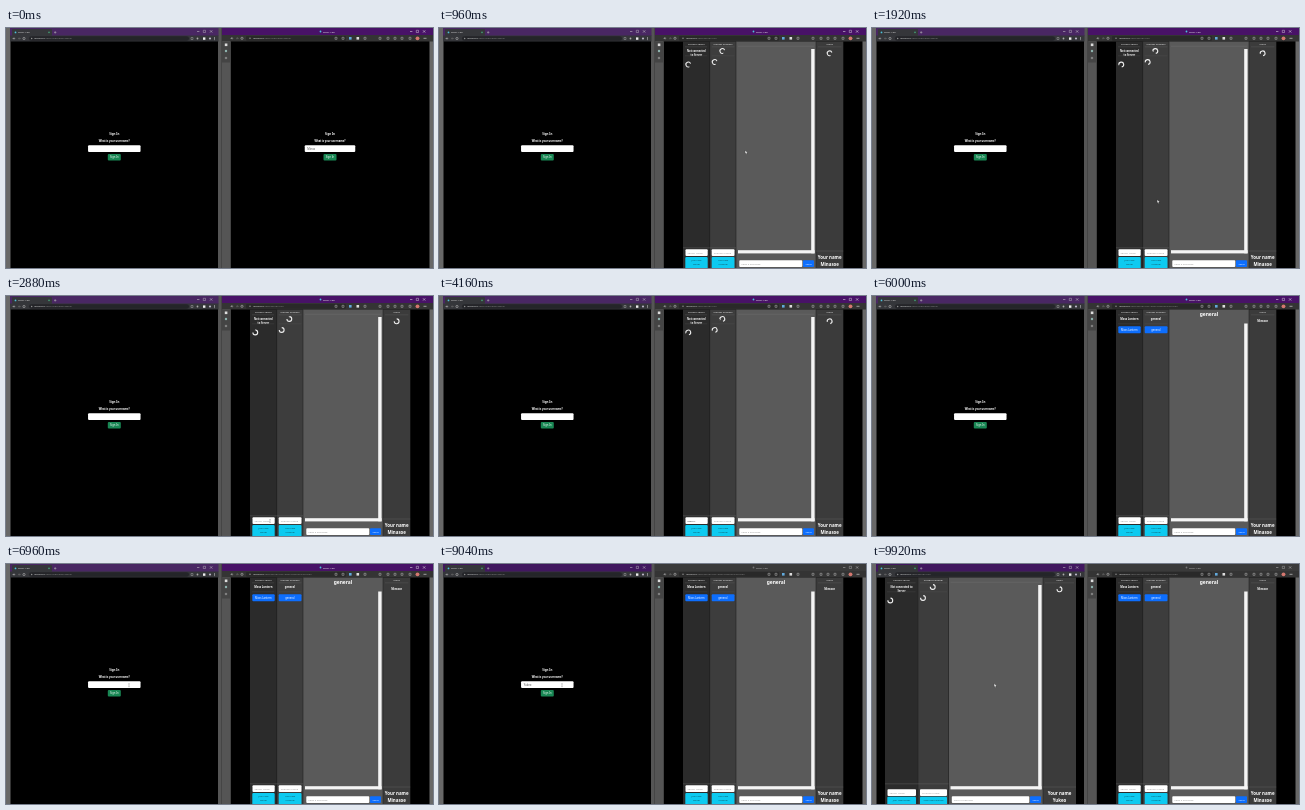
An HTML page for the animation above (10000 ms loop, 427 by 240 pixels).

```html
<!DOCTYPE html>
<html lang="en">
<head>
<meta charset="utf-8">
<title>Two chat windows</title>
<style>
  html, body { margin: 0; width: 100%; height: 100%; overflow: hidden; background: #666; }
  svg { display: block; width: 100vw; height: 100vh; }
  text { font-family: "Noto Sans", "Open Sans", sans-serif; white-space: pre; }
</style>
</head>
<body>
<svg id="stage" viewBox="0 0 427 240" preserveAspectRatio="none"></svg>
<script>
const LOOP = 10000, STEP = 80;
const HOST_NAME = 'Minasoe', GUEST_NAME = 'Yukeo', SERVER = 'Moss Lantern';
const SIGNED_IN = 880, JOINED = 5360, FOCUS_LEFT = 7120, GUEST_IN = 9440;
const GUEST_KEYS = [7360, 7760, 8080, 8560, 9040];
const stage = document.getElementById('stage');

const rect = (x, y, w, h, fill, r = 0) =>
  `<rect x="${x}" y="${y}" width="${w}" height="${h}" rx="${r}" fill="${fill}"/>`;
const dot = (x, y, r, fill) => `<circle cx="${x}" cy="${y}" r="${r}" fill="${fill}"/>`;
const line = (d, color, w = .5) =>
  `<path d="${d}" fill="none" stroke="${color}" stroke-width="${w}"/>`;
const text = (x, y, size, str, { fill = '#fff', weight = 400, anchor = 'middle' } = {}) =>
  `<text x="${x}" y="${y}" font-size="${size}" fill="${fill}" font-weight="${weight}" text-anchor="${anchor}">${str}</text>`;
const bold = (x, y, size, str) => text(x, y, size, str, { weight: 700 });
const label = (x, y, size, str, fill) => text(x, y, size, str, { fill, anchor: 'start' });

function spinner(x, y, age) {
  const angle = 45 + age / 750 * 360;
  return `<circle cx="${x}" cy="${y}" r="2.4" pathLength="4" stroke-dasharray="3 1" fill="none"
    stroke="#eee" stroke-width="1.1" transform="rotate(${angle} ${x} ${y})"/>`;
}

function windowButtons(x, color) {
  return line(`M${x} 3.5h2.4`, color) + line(`M${x + 6.3} 2.3h2.2v2.2h-2.2z`, color, .4) +
    line(`M${x + 13} 2.3l2.3 2.3m0-2.3l-2.3 2.3`, color);
}

function navButtons(x, y) {
  return line(`M${x + 2.2} ${y}h-2.2l1-1m-1 1l1 1`, '#ccc', .5) +
    line(`M${x + 5} ${y}h2.2l-1-1m1 1l-1 1`, '#777', .5) +
    `<circle cx="${x + 11}" cy="${y}" r="1.1" fill="none" stroke="#ccc" stroke-width=".5"/>`;
}

function address(x, y, path) {
  return text(x, y, 2.5, `localhost<tspan fill="#888">:3000/${path}</tspan>`, { fill: '#eee', anchor: 'start' });
}

function leftChrome(active, path) {
  return rect(4, 0, 208.5, 8, active ? '#41175f' : '#492763') +
    rect(6, 1, 40, 7, '#35363a', 1) +
    dot(9.5, 4.4, .9, '#4cc3dd') + label(12, 5.3, 2.5, 'React App', '#ddd') +
    dot(43, 4.4, .8, '#43a276') + line('M48 4.4h2.4m-1.2-1.2v2.4', '#bbb') +
    windowButtons(191, '#ccc') +
    rect(4, 7.5, 208.5, 6, '#35363a') +
    rect(23, 8.2, 160, 4.6, '#242529', 2.3) +
    navButtons(7, 10.5) + dot(25.7, 10.5, .7, '#999') + address(28, 11.4, path) +
    line('M185 9.5h2v2h-2z', '#bbb', .4) + dot(191.5, 10.5, .9, '#aaa') +
    rect(197, 9.4, 2.4, 2.4, '#eee') + dot(204, 10.5, 1.1, '#b9b3c6') +
    line('M208.5 9v.7m0 .5v.7m0 .5v.7', '#ddd', .7);
}

function rightChrome(active, path) {
  const ink = active ? '#eee' : '#bbb';
  const icons = [330, 337, 359, 374, 382, 389, 396, 404];
  return rect(216, 0, 211, 7.5, active ? '#481267' : '#3a3a3a') +
    dot(314.5, 3.5, .9, active ? '#4cc3dd' : '#777') + label(317, 4.5, 2.5, 'React App', ink) +
    windowButtons(404, ink) +
    rect(216, 7, 211, 6.5, '#343434') +
    rect(240, 8, 100, 4.7, '#292929', 1) +
    navButtons(225, 10.3) + dot(244, 10.3, .7, '#999') + address(247, 11.3, path) +
    icons.map(x => line(`M${x - 1} 9.3h2v2h-2z`, '#c4c4c4', .45)).join('') +
    rect(343, 9, 2.6, 2.6, '#62a9dc') + rect(350.5, 9, 2.6, 2.6, '#ddd') +
    dot(411.5, 10.3, 1.9, '#d4776f') + line('M417.5 10.3h3', '#ccc', .7) +
    rect(216, 13.5, 8.5, 226.5, '#555') + rect(216, 13.5, 8.5, 21, '#444') +
    rect(218.8, 15.5, 2.6, 2.6, '#ddd') + dot(220, 23, 1.2, '#8fb5b0') +
    line('M218.8 30h2.4m-1.2-1.2v2.4', '#ccc');
}

function signIn(cx, inputWidth, typed) {
  const x = cx - inputWidth / 2;
  return bold(cx, 107.3, 2.9, 'Sign In') +
    text(cx, 113.8, 2.57, 'What is your username?', { weight: 600 }) +
    rect(x, 117.2, inputWidth, 6.8, '#fff', 1) +
    label(x + 2.6, 121.7, 2.7, typed, '#555') +
    rect(cx - 6.5, 126, 13, 6.6, '#198754', 1) +
    text(cx, 130.3, 2.6, 'Sign In');
}

function field(x, y, w, hint, typed = '') {
  return rect(x, y, w, 6.7, '#fff', .9) +
    label(x + 2, y + 4.4, 2.5, typed || hint, typed ? '#222' : '#999');
}

function joinButton(x, y, w, lines) {
  const c = x + w / 2;
  return rect(x, y, w, 12, '#0dcaf0', 1) +
    lines.map((s, i) => text(c, y + 4.4 + i * 4, 2.4, s, { fill: '#124a58' })).join('');
}

// cols: left edges of the server, channel, message and user columns, then the right end
function chat({ cols, name, age, joined, typed, narrow }) {
  const [s, c, m, u, end] = cols;
  const mid = (a, b) => (a + b) / 2;
  const sMid = mid(s, c), cMid = mid(c, m), mMid = mid(m, u), uMid = mid(u, end);
  const sw = c - s - 4.5, cw = m - c - 3.5;
  const formY = narrow ? 221.3 : 225.2;
  const barTop = joined ? 27.5 : 21;

  let out = rect(s, 13.5, c - s, 226.5, '#2b2b2b') + rect(c, 13.5, m - c, 226.5, '#3d3d3d') +
    rect(m, 13.5, u - m, 226.5, '#5a5a5a') + rect(u, 13.5, end - u, 226.5, '#3b3b3b') +
    line(`M${c} 13.5v226.5M${m} 13.5v226.5M${u} 13.5v226.5`, '#222', .6) +
    text(sMid, 17.4, 2.45, 'Current Server') + text(cMid, 17.4, 2.45, 'Current Channel') +
    text(uMid, 17.1, 2.45, 'Users') +
    line(`M${s + 2} 18.8h${sw}M${c + 2} 18.8h${cw}M${u + 2} 18.8h${end - u - 4}`, '#666', .3);

  if (joined) {
    out += bold(sMid, 23.8, 2.7, SERVER) + bold(cMid, 23.8, 2.7, 'general') +
      rect(s + 2.3, 30.3, sw + .2, 6.9, '#0d6efd', 1) + text(sMid, 34.8, 2.6, SERVER) +
      rect(c + 2, 30.3, cw, 6.9, '#0d6efd', 1) + text(cMid, 34.8, 2.6, 'general') +
      bold(mMid, 20, 4.9, 'general') + bold(uMid, 25.9, 2.6, name);
  } else {
    const lines = narrow ? ['Not connected', 'to Server'] : ['Not connected to', 'Server'];
    out += lines.map((l, i) => bold(sMid, 23.6 + i * 4.2, 2.55, l)).join('') +
      spinner(s + 5.3, 36.5, age) + spinner(cMid - .5, 23, age) +
      spinner(c + 5, 34, age) + spinner(uMid, 25.3, age) +
      line(`M${m + 2} 18.3h${u - m - 4}`, '#777', .3);
  }

  return out +
    line(`M${s + 2} 27.8h${sw}M${c + 2} 27.8h${cw}`, '#555', .3) +
    rect(u - 4.8, barTop, 3.4, 225.3 - barTop, '#f4f4f4') +
    rect(m + 2, 222.2, u - m - 3.4, 3.2, '#f4f4f4') +
    line(`M${s} 219.8h${m - s}M${u} 223h${end - u}`, '#666', .4) +
    field(s + 2.5, formY, sw, 'Server Name', typed) +
    field(c + 2, formY, cw, 'Channel Name') +
    joinButton(s + 2.3, formY + 7.6, sw + .2, narrow ? ['Join New', 'Server'] : ['Join New Server']) +
    joinButton(c + 2, formY + 7.6, cw, narrow ? ['Add New', 'Channel'] : ['Add New Channel']) +
    field(m + 3.3, 232.2, u - m - 17, 'Send a message') +
    rect(u - 13, 232.2, 11, 6.7, '#0d6efd', .9) + text(u - 7.5, 236.6, 2.5, 'Send') +
    bold(uMid, 230.8, 4.4, 'Your name') + bold(uMid, 238, 4.4, name);
}

function arrow(x, y) {
  return `<path d="M${x - .8} ${y - 1.6}v3.3l.8-.7.6 1.2.6-.3-.6-1.1h1z" fill="#fff" stroke="#222" stroke-width=".25"/>`;
}
const beam = (x, y) => line(`M${x - .6} ${y - 1.5}h1.2m-.6 0v3m-.6 0h1.2`, '#777', .4);

function glide(t, start, end, [x0, y0], [x1, y1]) {
  const p = Math.min(1, Math.max(0, (t - start) / (end - start)));
  const e = p * p * (3 - 2 * p);
  return [x0 + (x1 - x0) * e, y0 + (y1 - y0) * e];
}

function pointer(t) {
  const first = [307, 124], serverField = [264, 225], guestField = [123, 121.2];
  if (t < SIGNED_IN) return '';
  if (t < 2560) return arrow(...glide(t, 1300, 2560, first, serverField));
  if (t < 3280) return beam(...serverField);
  if (t < 6080) return '';
  if (t < 6960) return arrow(...glide(t, 6080, 6960, serverField, guestField));
  return (t < GUEST_IN ? beam : arrow)(...guestField);
}

function scene(t) {
  const joined = t >= JOINED, leftActive = t >= FOCUS_LEFT;
  const hostIn = t >= SIGNED_IN, guestIn = t >= GUEST_IN;
  const hostTyped = HOST_NAME.slice(0, 5 + (t >= 80) + (t >= 640));
  const guestTyped = GUEST_NAME.slice(0, GUEST_KEYS.filter(k => t >= k).length);
  const serverTyped = joined ? '' : SERVER.slice(0, Math.max(0, Math.floor((t - 3200) / 160)));
  const path = joined ? 'server/63c1f0a8/channel/63c1f0b2' : hostIn ? 'server/null' : 'username/signin';

  return rect(0, 0, 427, 240, '#686868') + rect(4.5, 13, 207.5, 227, '#000') +
    rect(212, 0, 4.5, 240, '#555') + rect(215.7, 0, .8, 240, '#222') +
    rect(224.5, 13, 199, 227, '#000') +
    leftChrome(leftActive, guestIn ? 'server/null' : 'username/signin') +
    rightChrome(!leftActive, path) +
    (guestIn
      ? chat({ cols: [13, 46, 76.5, 171, 204], name: GUEST_NAME, age: t - GUEST_IN })
      : signIn(108.3, 52.5, guestTyped)) +
    (hostIn
      ? chat({ cols: [244, 270.7, 297, 377, 404.3], name: HOST_NAME, age: t - 910, joined, typed: serverTyped, narrow: true })
      : signIn(324, 50.5, hostTyped)) +
    pointer(t);
}

let shown = -1;
const began = performance.now();
function tick() {
  const t = Math.floor((performance.now() - began) % LOOP / STEP) * STEP;
  if (t !== shown) stage.innerHTML = scene(shown = t);
  requestAnimationFrame(tick);
}
tick();
</script>
</body>
</html>
```
